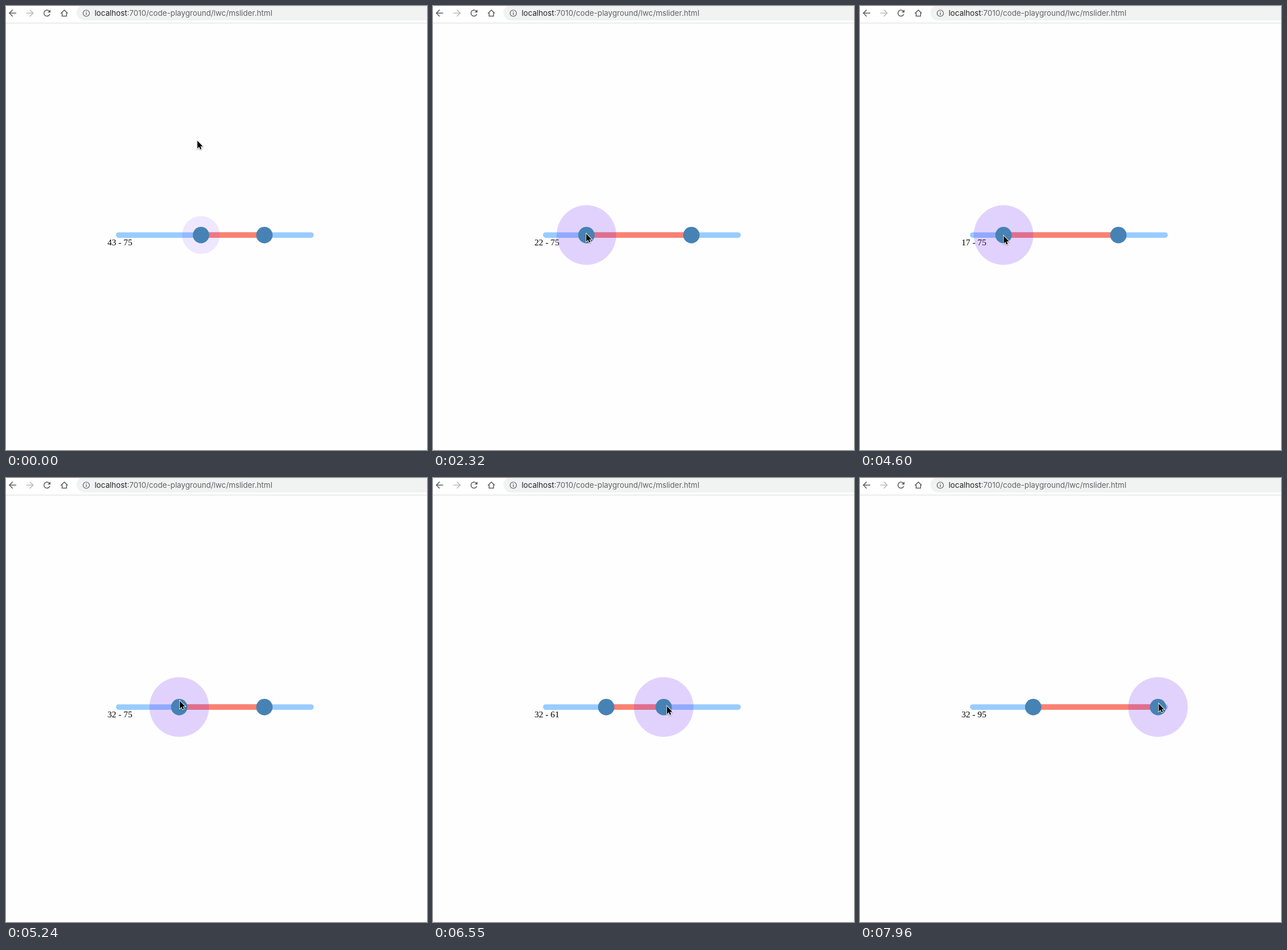
Write an HTML page with a canvas that moves like this. It is 729x768 px and loops after 8 s.

```html
<!DOCTYPE html>
<html lang="en">
<head>
<meta charset="utf-8">
<title>Range slider</title>
<style>
  html, body { margin: 0; width: 100%; height: 100%; overflow: hidden; background: #fefefe; }
  canvas { display: block; }
</style>
</head>
<body>
<canvas id="stage" width="729" height="768"></canvas>
<script>
const ctx = document.getElementById('stage').getContext('2d');
const LOOP = 8000;
const TRACK = { x: 190.4, y: 391.4, width: 342.6, height: 9.5 };
const MID_Y = 396.2;
const SMALL = { radius: 32.7, alpha: 0.1 };
const LARGE = { radius: 51.6, alpha: 0.2 };

// Pointer moves: each runs from start to end in a number of visible steps.
const START = { x: 331, y: 232, low: 43, high: 75 };
const MOVES = [
  { start: 90, end: 260, steps: 3, to: { x: 330, y: 193 } },
  { start: 640, end: 1350, steps: 12, to: { x: 338, y: 395 } },
  { start: 1620, end: 2320, steps: 10, to: { x: 265, y: 393, low: 22 } },
  { start: 2590, end: 3380, steps: 13, to: { x: 197, y: 401, low: 2 } },
  { start: 3560, end: 3560, steps: 1, to: { x: 196.5, y: 403 } },
  { start: 3650, end: 3960, steps: 5, to: { x: 189, y: 404, low: 0 } },
  { start: 4250, end: 5010, steps: 12, to: { x: 284, y: 392, low: 27 } },
  { start: 5100, end: 5240, steps: 3, to: { x: 300.5, y: 384.5, low: 32 } },
  { start: 5360, end: 5900, steps: 8, to: { x: 463, y: 393 } },
  { start: 5990, end: 5990, steps: 1, to: { x: 455, y: 396.5 } },
  { start: 6190, end: 6190, steps: 1, to: { x: 436, y: 396, high: 70 } },
  { start: 6250, end: 6910, steps: 9, to: { x: 381, y: 392, high: 55 } },
  { start: 7210, end: 7330, steps: 3, to: { x: 425, y: 386.5 } },
  { start: 7420, end: 7960, steps: 7, to: { x: 517, y: 389.5, high: 95 } }
];

// Halo around the hovered (small) or dragged (large) thumb.
const HALOS = [
  { from: 0, thumb: 'low', size: SMALL },
  { from: 90 },
  { from: 1220, thumb: 'low', size: SMALL },
  { from: 1620, thumb: 'low', size: LARGE },
  { from: 5360, thumb: 'low', size: SMALL },
  { from: 5430 },
  { from: 5990, thumb: 'high', size: SMALL },
  { from: 6190, thumb: 'high', size: LARGE }
];

const easeOut = p => p * (1.5 - 0.5 * p);
const thumbX = value => 190.2 + 3.43 * value;

function progress(move, time) {
  if (time >= move.end) return 1;
  const step = Math.floor((time - move.start) / (move.end - move.start) * (move.steps - 1));
  return easeOut((step + 1) / move.steps);
}

function stateAt(time) {
  const state = { ...START };
  for (const move of MOVES) {
    if (time < move.start) break;
    const p = progress(move, time);
    for (const key in move.to) state[key] += (move.to[key] - state[key]) * p;
  }
  state.low = Math.round(state.low);
  state.high = Math.round(state.high);
  state.halo = HALOS.filter(halo => time >= halo.from).pop();
  return state;
}

function polyline(points, close) {
  ctx.beginPath();
  points.forEach(([x, y]) => ctx.lineTo(x, y));
  if (close) ctx.closePath();
}

function strokeLine(points, close) {
  polyline(points, close);
  ctx.stroke();
}

function disc(x, y, radius, color) {
  ctx.beginPath();
  ctx.arc(x, y, radius, 0, Math.PI * 2);
  ctx.fillStyle = color;
  ctx.fill();
}

function write(text, x, y, font, color) {
  ctx.font = font;
  ctx.fillStyle = color;
  ctx.fillText(text, x, y);
}

function navArrow(x, direction, color) {
  ctx.strokeStyle = color;
  strokeLine([[x, 12.3], [x - direction * 11.8, 12.3]]);
  strokeLine([[x - direction * 5.7, 6.6], [x, 12.3], [x - direction * 5.7, 18]]);
}

function drawToolbar() {
  ctx.fillStyle = '#fff';
  ctx.fillRect(0, 0, 729, 29);
  ctx.fillStyle = '#dadcdd';
  ctx.fillRect(0, 29, 729, 1);
  ctx.beginPath();
  ctx.roundRect(122, -2, 640, 27, 13.5);
  ctx.fillStyle = '#f1f3f3';
  ctx.fill();

  ctx.lineWidth = 1.5;
  navArrow(5.8, -1, '#5b5e62');
  navArrow(47, 1, '#babcbe');

  ctx.strokeStyle = ctx.fillStyle = '#5b5e62';
  ctx.beginPath();
  ctx.arc(71, 12.3, 5.2, 0.35, Math.PI * 2 - 0.75);
  ctx.stroke();
  polyline([[77, 6.2], [77, 11.3], [71.9, 11.3]], true);
  ctx.fill();

  strokeLine([[95.2, 12.8], [101, 7], [106.8, 12.8]]);
  strokeLine([[97.2, 11.5], [97.2, 17.6], [104.8, 17.6], [104.8, 11.5]]);

  ctx.lineWidth = 1.2;
  ctx.beginPath();
  ctx.arc(139, 12.5, 5.5, 0, Math.PI * 2);
  ctx.stroke();
  ctx.fillRect(138.4, 11.7, 1.3, 3.8);
  ctx.fillRect(138.4, 9.3, 1.3, 1.3);

  const font = '13.2px Inter, sans-serif';
  const host = 'localhost';
  write(host, 153.4, 17, font, '#202124');
  write(':7010/code-playground/lwc/mslider.html', 153.4 + ctx.measureText(host).width, 17, font, '#5f6368');
}

function drawSlider({ low, high, halo }) {
  ctx.beginPath();
  ctx.roundRect(TRACK.x, TRACK.y, TRACK.width, TRACK.height, TRACK.height / 2);
  ctx.fillStyle = '#99ccff';
  ctx.fill();
  ctx.fillStyle = '#ff8170';
  ctx.fillRect(thumbX(low), TRACK.y, thumbX(high) - thumbX(low), TRACK.height);

  write(`${low} - ${high}`, 175.7, 414, '15.2px "Liberation Serif", serif', '#000');

  if (halo.thumb) {
    const x = thumbX(halo.thumb === 'low' ? low : high);
    disc(x, MID_Y, halo.size.radius, `rgba(110, 35, 248, ${halo.size.alpha})`);
  }
  for (const value of [low, high]) disc(thumbX(value), MID_Y, 14.2, '#4682b4');
}

function drawPointer({ x, y }) {
  ctx.save();
  ctx.translate(x + 0.4, y + 1);
  polyline([[0, 0], [0, 13.4], [3.1, 10.5], [5, 15], [7.1, 14.1], [5.2, 9.7], [9.3, 9.7]], true);
  ctx.shadowColor = 'rgba(0, 0, 0, 0.35)';
  ctx.shadowBlur = 2;
  ctx.shadowOffsetY = 1;
  ctx.strokeStyle = '#fff';
  ctx.lineWidth = 1.8;
  ctx.stroke();
  ctx.shadowColor = 'transparent';
  ctx.fillStyle = '#000';
  ctx.fill();
  ctx.restore();
}

function render(now) {
  const state = stateAt(now % LOOP);
  ctx.fillStyle = '#fefefe';
  ctx.fillRect(0, 0, 729, 768);
  drawToolbar();
  drawSlider(state);
  drawPointer(state);
}

const began = performance.now();
function tick() {
  render(performance.now() - began);
  requestAnimationFrame(tick);
}
tick();
</script>
</body>
</html>
```
